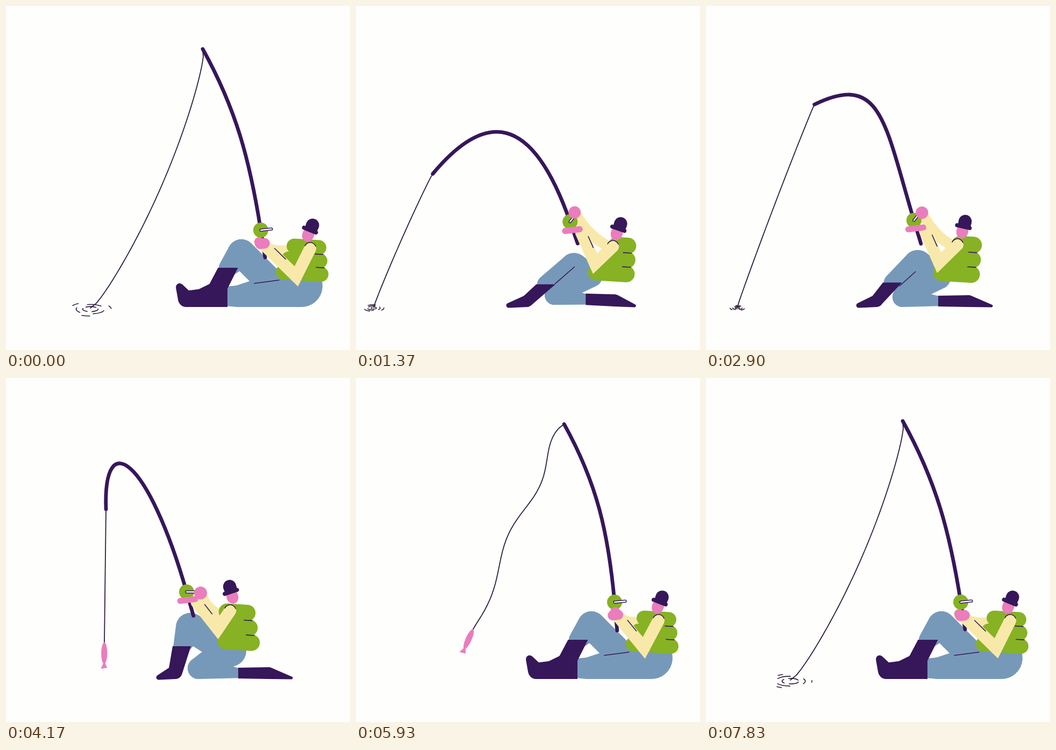
An HTML page with a canvas that plays this animation: 640x640 px, repeating every 7.86 s.

```html
<!DOCTYPE html>
<html lang="en">
<head>
<meta charset="utf-8">
<title>Angler</title>
<style>
html, body { margin: 0; width: 100%; height: 100%; overflow: hidden; background: #fefefc; }
canvas { display: block; width: 100vw; height: 100vh; }
</style>
</head>
<body>
<canvas id="stage" width="640" height="640"></canvas>
<script>
const ctx = document.getElementById('stage').getContext('2d');
const LOOP = 7860;
const PAPER = '#fefefc', DARK = '#36175a', BLUE = '#7799b9', GREEN = '#86b223',
      YELLOW = '#f8e9aa', PINK = '#ea7dbc', INK = '#2c1c3c';

const lerp = (a, b, u) => a + (b - a) * u;
const rad = deg => deg * Math.PI / 180;
const mixPoint = (p, q, u) => p.map((v, i) => lerp(v, q[i], u));
const mix = (a, b, u) => {
  const out = {};
  for (const k in a) out[k] = a[k].map((p, i) => mixPoint(p, b[k][i], u));
  return out;
};

// Joints are [x, y, size]. Legs: hip, knee, cuff, ankle, toe. Vest: top and bottom roll.
// Reel, tip and head carry an angle in degrees, the hand its half length.
// The end of the line carries the ripple size; slack is [sag, wave, crank angle].
const sit = {
  front: [[508, 530, 26], [438, 460, 26], [413, 487, 18.5], [391, 530, 17], [360, 543, 15]],
  back: [[550, 521, 39], [432, 540, 20], [412, 540, 20], [335, 545, 15], [323, 523, 7]],
  fold: [[462, 516, 0], [508, 510, 0]],
  vest: [[559, 448, 23], [551, 497, 35]],
  head: [[566, 416, 22]],
  reel: [[474, 417, 9]],
  tip: [[366, 80, 29]],
  arm: [[566, 451, 0], [540, 503, 0]],
  hand: [[477, 442, 4]],
  palm: [[471, 439, 9]],
  end: [[157, 562, .8]],
  slack: [[31, 0, -6]]
};
const dragged = {
  front: [[430, 487, 31], [334, 474, 20], [345, 492, 16], [319, 548, 12], [284, 557, 4.5]],
  back: [[430, 487, 31], [385, 490, 22], [375, 508, 17], [396, 534, 14], [373, 555, 5]],
  fold: [[340, 470, 0], [334, 488, 0]],
  vest: [[388, 430, 17], [442, 463, 18]],
  head: [[347, 407, -35]],
  reel: [[322, 428, 45]],
  tip: [[62, 450, 142]],
  arm: [[388, 440, 0], [408, 461, 0]],
  hand: [[330, 449, 8]],
  palm: [[303, 440, 10.5]],
  end: [[24, 560, .4]],
  slack: [[0, 0, 148]]
};
const kneel = {
  front: [[430, 498, 20], [412, 487, 27], [354, 520, 18], [318, 549, 11], [284, 557, 4.5]],
  back: [[440, 505, 18], [368, 542, 18], [432, 549, 10], [489, 549, 11], [531, 558, 2.5]],
  fold: [[373, 521, 0], [413, 485, 0]],
  vest: [[505, 447, 10], [478, 500, 29]],
  head: [[501, 414, 24]],
  reel: [[405, 399, 17]],
  tip: [[212, 229, 150]],
  arm: [[486, 448, 0], [448, 481, 0]],
  hand: [[409, 414, 14]],
  palm: [[416, 379, 11.5]],
  end: [[62, 560, .3]],
  slack: [[-4, 0, -70]]
};
const show = {
  front: [[417, 507, 30], [343, 464, 27], [327, 499, 17], [315, 547, 13], [284, 557, 4.5]],
  back: [[417, 507, 30], [358, 540, 20], [432, 549, 10], [489, 549, 11], [531, 558, 2.5]],
  fold: [[325, 520, 0], [325, 520, 0]],
  vest: [[430, 436, 19], [433, 491, 24]],
  head: [[418, 397, -18]],
  reel: [[336, 398, 16]],
  tip: [[186, 244, 182]],
  arm: [[417, 433, 0], [394, 467, 0]],
  hand: [[338, 413, 14]],
  palm: [[362, 400, 12]],
  end: [[183, 492, 0]],
  slack: [[0, 0, 0]]
};
const reelIn = {
  ...sit,
  head: [[562, 416, 17]],
  reel: [[515, 417, -13]],
  tip: [[444, 200, 142]],
  arm: [[548, 451, 0], [515, 498, 0]],
  hand: [[510, 437, 11]],
  palm: [[536, 420, 11]],
  end: [[313, 361, 0]],
  slack: [[0, 0, 0]]
};

const shiftUpper = (p, dx, dy) => {
  const out = { ...p };
  for (const k of ['vest', 'head', 'reel', 'arm', 'hand', 'palm'])
    out[k] = p[k].map(([x, y, e]) => [x + dx, y + dy, e]);
  return out;
};
// Same body with another rod tip and line end.
const cast = (p, tip, end, slack = p.slack[0]) => ({ ...p, tip: [tip], end: [end], slack: [slack] });

const low = cast(kneel, [150, 300, 140], [34, 560, .45]);
const heave = cast(kneel, [250, 54, 65], [58, 560, .3]);
const dip = cast(show, [120, 300, 140], [54, 560, .35]);
const lean = cast(shiftUpper(kneel, 60, 12), [340, 54, 45], [90, 548, .4]);
const landed = cast(lean, [340, 54, 60], [190, 400, 0]);
const swing = cast(reelIn, [345, 230, 145], [205, 445, 0]);
const lift = cast(mix(show, swing, .25), [225, 238, 170], [142, 478, 0]);
const wind = cast(reelIn, [556, 56, 15], [470, 240, 0]);
const flung = cast(sit, [352, 92, 32], [165, 515, 0], [-4, 10, -6]);
const plunge = cast(sit, [355, 86, 31], [151, 562, .3], [-10, 15, -6]);
const splash = cast(sit, [360, 81, 27], [151, 562, 1], [-8, 8, -6]);

const TRACK = [
  [0, sit], [300, sit], [725, dragged], [1000, dragged], [1450, low], [1600, low],
  [1800, heave], [2040, kneel], [2350, dip], [2500, dip], [2800, mix(kneel, heave, .5)],
  [3100, dip], [3350, dip], [3600, lean], [3800, landed], [4150, show], [4430, show],
  [4700, lift], [5020, swing], [5340, reelIn], [5600, wind], [6050, flung],
  [6150, plunge], [6530, splash], [7200, sit], [LOOP, sit]
];

const poseAt = t => {
  const i = TRACK.findIndex(([end]) => t < end);
  const [t0, a] = TRACK[i - 1], [t1, b] = TRACK[i];
  const u = (t - t0) / (t1 - t0);
  return mix(a, b, u * u * (3 - 2 * u));
};

const stroke = (color, width) => {
  ctx.strokeStyle = color;
  ctx.lineWidth = width;
  ctx.stroke();
};
const fill = color => {
  ctx.fillStyle = color;
  ctx.fill();
};
const disc = (x, y, rx, color, ry = rx) => {
  ctx.beginPath();
  ctx.ellipse(x, y, rx, ry, 0, 0, 7);
  fill(color);
};
const trace = pts => {
  ctx.beginPath();
  pts.forEach(([x, y]) => ctx.lineTo(x, y));
};
const line = (pts, color, width) => {
  trace(pts);
  stroke(color, width);
};
const placed = (x, y, angle, paint) => {
  ctx.save();
  ctx.translate(x, y);
  ctx.rotate(angle);
  paint();
  ctx.restore();
};

// Hull of two circles.
function taper([x1, y1, r1], [x2, y2, r2], color) {
  const a = Math.atan2(y2 - y1, x2 - x1);
  const d = Math.hypot(x2 - x1, y2 - y1) || 1;
  const b = Math.acos(Math.max(-1, Math.min(1, (r1 - r2) / d)));
  ctx.beginPath();
  ctx.arc(x1, y1, r1, a + b, a - b + 2 * Math.PI);
  ctx.arc(x2, y2, r2, a - b, a + b);
  fill(color);
}

// The cuff runs along (cx, cy): level on the front leg, upright on the back one.
function drawLeg([hip, knee, cuff, ankle, toe], cx, cy) {
  const [x, y, r] = cuff, [ax, ay, ar] = ankle;
  taper(hip, knee, BLUE);
  taper(knee, [x, y, r * .92], BLUE);
  const d = Math.hypot(ax - x, ay - y) || 1;
  let nx = (y - ay) / d * ar, ny = (ax - x) / d * ar;
  if (nx * cx + ny * cy < 0) [nx, ny] = [-nx, -ny];
  trace([[x - cx * r, y - cy * r], [x + cx * r, y + cy * r], [ax + nx, ay + ny], [ax - nx, ay - ny]]);
  fill(DARK);
  taper(ankle, toe, DARK);
}

function drawVest([top, low]) {
  const width = Math.hypot(low[0] - top[0], low[1] - top[1]) / 2 + 3;
  const roll = (u, from, to) => {
    const [x, y, half] = mixPoint(top, low, u);
    return [from(half), to(half)].map(k => [x + k, y + k * .06]);
  };
  for (const u of [0, .5, 1]) line(roll(u, h => -h, h => h), GREEN, width);
  for (const u of [.25, .75]) line(roll(u, h => h - 8, h => h + 7), DARK, 1.6);
}

function drawHead([x, y, tilt]) {
  placed(x, y, rad(tilt), () => {
    disc(0, 10, 11, PINK, 13.5);
    disc(1, -9, 12.2, DARK, 12.5);
    ctx.fillRect(-11, -9, 24, 9);
    line([[-12, 1], [12, 1]], DARK, 7.5);
  });
}

// The sharper the rod turns between reel and tip, the longer its handles.
function drawRod([rx, ry, ra], [tx, ty, ta]) {
  const a = rad(ra), b = rad(ta), turn = (b - a) ** 2;
  const reach = .36 * Math.hypot(tx - rx, ty - ry);
  const p = reach * (1 + .28 * turn), q = reach * (1 + .12 * turn);
  const butt = 54 * Math.cos(a) ** 4;
  const bx = rx + butt * Math.sin(a), by = ry + butt * Math.cos(a);
  ctx.beginPath();
  ctx.moveTo(bx, by);
  ctx.lineTo(rx, ry);
  ctx.bezierCurveTo(rx - p * Math.sin(a), ry - p * Math.cos(a),
    tx + q * Math.sin(b), ty + q * Math.cos(b), tx, ty);
  stroke(DARK, 6.8);
}

function drawLine([tx, ty], [ex, ey], [sag, wave], hasFish) {
  const dx = ex - tx, dy = ey - ty, len = Math.hypot(dx, dy);
  ctx.beginPath();
  for (let i = 0; i <= 40; i++) {
    const u = i / 40;
    const k = (sag * Math.abs(Math.sin(Math.PI * u)) ** .6 - wave * Math.sin(4 * Math.PI * u ** .8)) / len;
    ctx.lineTo(tx + dx * u + dy * k, ty + dy * u - dx * k);
  }
  stroke(INK, 1.8);
  if (hasFish) placed(ex, ey, Math.atan2(dy, dx) - Math.PI / 2, () => {
    disc(0, 20, 5.6, PINK, 20);
    trace([[0, 35], [6, 47], [-6, 49]]);
    fill(PINK);
  });
}

function drawRipples([x, y, size], t) {
  if (size < .05) return;
  for (let k = 0; k < 3; k++) {
    const p = (t / 900 + k / 3 + .945) % 1, rx = size * (5 + 46 * p);
    for (let from = 1.6; from < 7; from += 2.1) {
      ctx.beginPath();
      ctx.ellipse(x, y + 2, rx, rx * .33, 0, from + k * .4, from + k * .4 + 1.7 * Math.sqrt(1 - p));
      stroke(INK, 1.6);
    }
  }
}

// Peak of each drop's arc and how long it is stretched.
const DROPS = [[-36, -77, 22], [-42, -43, 1], [10, -61, 0], [44, -57, 6], [60, -28, 0]];

function drawDrops(t) {
  const s = (t - 6130) / 400;
  if (s < .08 || s > 1.7) return;
  for (const [dx, dy, length] of DROPS) {
    const y = 562 + dy * (2 * s - s * s), half = length / 2;
    if (y < 560) placed(152 + dx * s, y, dx < 0 ? .85 : -.5, () => {
      ctx.beginPath();
      ctx.moveTo(-half, 0);
      ctx.quadraticCurveTo(0, -length / 4, half + .1, 0);
      stroke(INK, 5.6);
      stroke(PAPER, 2.6);
    });
  }
}

function drawFarArm([x, y, half], [px, py]) {
  const sx = x - half - 6, sy = y + 6;
  ctx.beginPath();
  ctx.moveTo(sx, sy);
  ctx.quadraticCurveTo((sx + px) / 2 - 10, (sy + py) / 2 + 14, px, py);
  stroke(YELLOW, 20);
}

function drawNearArm([shoulder, elbow], [hx, hy, half]) {
  const wrist = [hx + half * 1.2, hy + 4];
  ctx.lineJoin = 'miter';
  ctx.miterLimit = 2.4;
  line([shoulder, elbow, wrist], YELLOW, 22.5);
  ctx.lineJoin = 'round';
  disc(elbow[0], elbow[1], 11.2, YELLOW);

  ctx.beginPath();
  ctx.arc(shoulder[0], shoulder[1], 11, 3.6, 5.9);
  stroke(DARK, 1.6);
  const dx = elbow[0] - wrist[0], dy = elbow[1] - wrist[1], d = Math.hypot(dx, dy);
  line([.2, .55].map(u => [wrist[0] + dx * u + dy / d * 9, wrist[1] + dy * u - dx / d * 9]), DARK, 1.6);
}

function drawReel([x, y], crank) {
  disc(x, y, 14, GREEN);
  placed(x, y, rad(crank), () => {
    const handle = [[0, 0], [20, 0]];
    line(handle, DARK, 5.4);
    line(handle, '#fff', 2.4);
  });
}

function draw(t) {
  const p = poseAt(t);
  const [tip] = p.tip, [reel] = p.reel, [end] = p.end, [slack] = p.slack, [hand] = p.hand, [palm] = p.palm;
  ctx.fillStyle = PAPER;
  ctx.fillRect(0, 0, 640, 640);
  ctx.lineCap = ctx.lineJoin = 'round';

  drawRipples(end, t);
  drawDrops(t);
  drawLine(tip, end, slack, t > 3570 && t < 6140);

  drawLeg(p.back, 0, 1);
  drawLeg(p.front, 1, 0);
  line(p.fold, DARK, 1.6);
  drawFarArm(p.vest[0], palm);
  drawVest(p.vest);
  drawHead(p.head[0]);
  drawRod(reel, tip);
  drawNearArm(p.arm, hand);
  drawReel(reel, slack[2]);

  const [hx, hy, half] = hand;
  line([[hx - half, hy + half * .12], [hx + half, hy - half * .12]], PINK, 23 - half * .85);
  disc(...palm, PINK);
}

const start = performance.now();
function tick() {
  draw((performance.now() - start) % LOOP);
  requestAnimationFrame(tick);
}
tick();
</script>
</body>
</html>
```
